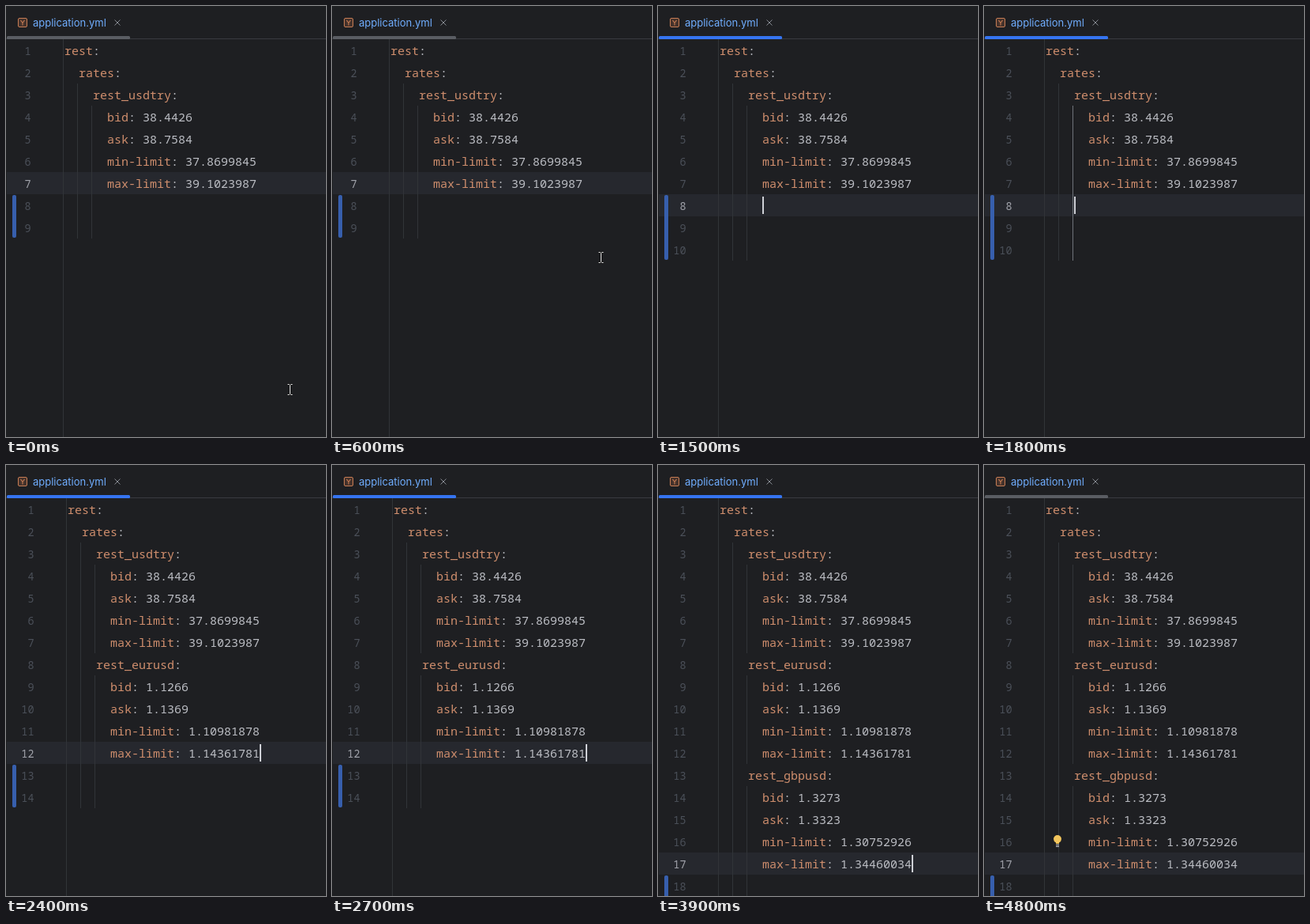
An HTML page that plays this animation: 405 px wide and 545 px high, repeating every 5.1 s.

```html
<!DOCTYPE html>
<html>
<head>
<meta charset="utf-8">
<style>
  html, body { margin: 0; width: 100%; height: 100%; overflow: hidden; background: #1e1f22; }
  svg { display: block; width: 405px; height: 545px; }
  text { white-space: pre; }
  .code { font: 15px "Noto Sans Mono", "DejaVu Sans Mono", monospace; fill: #bcbec4; }
  .key { fill: #cf8e6d; }
  .num { font: 13.5px "Noto Sans Mono", "DejaVu Sans Mono", monospace; fill: #4b5059; text-anchor: end; }
  .num.on { fill: #a1a3ab; }
  .tab { font: 13px Inter, sans-serif; fill: #70aeff; }
</style>
</head>
<body>
<svg id="editor" viewBox="0 0 405 545"></svg>
<script>
const editor = document.getElementById('editor');
const LOOP = 5100, ROW = 28, CHAR = 9;

const pairs = [
  ['usdtry', '38.4426', '38.7584', '37.8699845', '39.1023987'],
  ['eurusd', '1.1266', '1.1369', '1.10981878', '1.14361781'],
  ['gbpusd', '1.3273', '1.3323', '1.30752926', '1.34460034']
];
const fields = ['bid', 'ask', 'min-limit', 'max-limit'];

// Each step changes only the listed properties of the editor.
const steps = [
  { at: 0, pairs: 1, rows: 9, active: 7, caret: -1, bulb: 0, focus: false, lit: false, mouse: [356, 477] },
  { at: 300, mouse: [350, 382] },
  { at: 600, mouse: [337, 310] },
  { at: 900, mouse: [343, 221], focus: true, caret: 27 },
  { at: 1200, mouse: [337, 218], caret: -1 },
  { at: 1500, mouse: null, rows: 10, active: 8, caret: 6 },
  { at: 1800, caret: 4, lit: true },
  { at: 2400, pairs: 2, rows: 14, active: 12, caret: 27, lit: false },
  { at: 3000, rows: 15, active: 13, caret: 6 },
  { at: 3300, caret: 4, lit: true, bulb: 12 },
  { at: 3900, pairs: 3, rows: 19, active: 17, caret: 27, lit: false, bulb: 0 },
  { at: 4200, bulb: 16 },
  { at: 4800, focus: false, caret: -1 }
];

const rowTop = row => 42 + (row - 1) * ROW;
const rect = (x, y, w, h, fill, r = 0, stroke = 'none') =>
  `<rect x="${x}" y="${y}" width="${w}" height="${h}" rx="${r}" fill="${fill}" stroke="${stroke}"/>`;
const label = (x, y, cls, str) => `<text x="${x}" y="${y}" class="${cls}">${str}</text>`;

function tabBar(focus) {
  return rect(0, 41, 405, 1, '#393b40')
    + rect(1, 38, 156, 4, focus ? '#3574f0' : '#5a5d63', 1.5)
    + rect(15.5, 15.5, 11, 11, '#45322b', 1.5, '#c77d55')
    + '<path d="M18.5 18L21 21.3L23.5 18M21 21.3V24.5" fill="none" stroke="#c77d55" stroke-width="1.1"/>'
    + label(34, 26, 'tab', 'application.yml')
    + '<path d="M137.5 17.5l7 7m0 -7l-7 7" stroke="#868a91"/>';
}

function lightBulb(row) {
  const y = rowTop(row);
  return `<path d="M91 ${y + 17}v-1.5q-3 -1.6 -3 -4.5a5 5 0 0 1 10 0q0 2.9 -3 4.5v1.5z" fill="#f2c55c"/>`
    + rect(91, y + 18, 4, 1, '#ced0d6') + rect(91, y + 20, 4, 1, '#ced0d6');
}

function pointer([x, y]) {
  const d = `M${x + .5} ${y + 1.5}h2l1 1l1 -1h2M${x + 3.5} ${y + 2.5}v11M${x + .5} ${y + 14.5}h2l1 -1l1 1h2`;
  return `<path d="${d}" fill="none" stroke="#111" stroke-width="2"/>`
    + `<path d="${d}" fill="none" stroke="#e8e8e8"/>`;
}

function draw(s) {
  const edge = s.rows > 9 ? 76 : 72, left = edge + 2;
  const last = 2 + 5 * s.pairs, end = rowTop(s.rows + 1);
  let out = rect(0, 0, 405, 545, '#1e1f22')
    + rect(1, rowTop(s.active), 404, ROW, '#26282e')
    + rect(edge, 42, 1, 503, '#313438')
    + rect(edge + 18, rowTop(3), 1, end - rowTop(3), '#313438')
    + rect(8, rowTop(last + 1) + 1, 5, end - rowTop(last + 1) - 2, '#375fad', 2);

  const line = (row, col, key, value = '') => {
    out += label(left + col * CHAR, rowTop(row) + 20, 'code',
      `<tspan class="key">${key}</tspan>:${value && ' ' + value}`);
  };
  line(1, 0, 'rest');
  line(2, 2, 'rates');
  pairs.slice(0, s.pairs).forEach(([name, ...values], i) => {
    const row = 3 + i * 5, final = i === s.pairs - 1;
    const from = rowTop(row + 1), to = final ? end : rowTop(row + 5);
    out += rect(edge + 36, from, 1, to - from, final && s.lit ? '#6f737a' : '#313438');
    line(row, 4, 'rest_' + name);
    values.forEach((v, j) => line(row + 1 + j, 6, fields[j], v));
  });

  for (let r = 1; r <= s.rows; r++)
    out += label(edge - 40.5, rowTop(r) + 20, r === s.active ? 'num on' : 'num', r);
  if (s.bulb) out += lightBulb(s.bulb);
  if (s.caret >= 0) out += rect(left + s.caret * CHAR, rowTop(s.active) + 3, 2, 22, '#ced0d6');
  out += tabBar(s.focus);
  if (s.mouse) out += pointer(s.mouse);
  editor.innerHTML = out;
}

const began = performance.now();
let shown = 0;
function tick() {
  const t = (performance.now() - began) % LOOP;
  const past = steps.filter(s => s.at <= t);
  if (past.length !== shown) {
    shown = past.length;
    draw(Object.assign({}, ...past));
  }
  requestAnimationFrame(tick);
}
tick();
</script>
</body>
</html>
```
